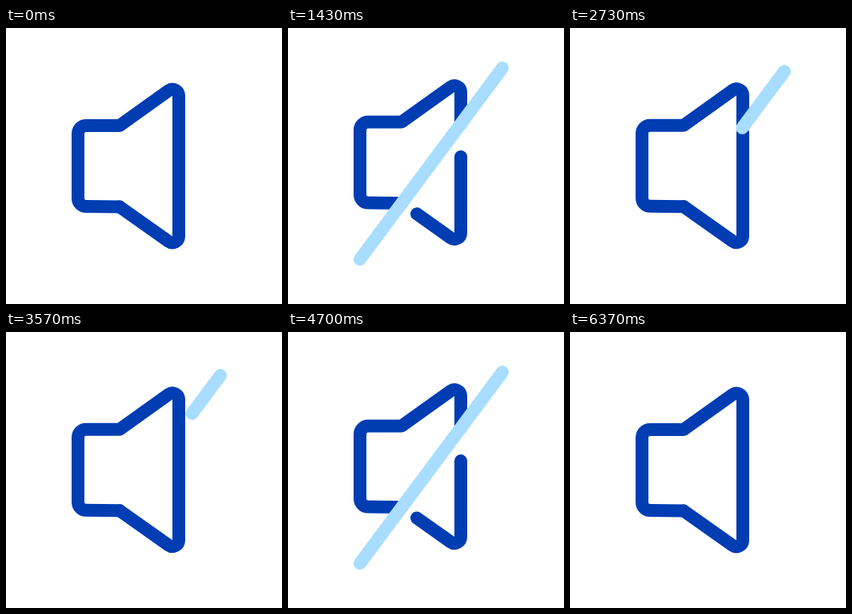
Animation of 345x345 px, one loop 6710 ms. Source, as an HTML page:

```html
<!DOCTYPE html>
<html lang="en">
<head>
<meta charset="utf-8">
<title>Mute icon</title>
<style>
  html, body { margin: 0; width: 100%; height: 100%; overflow: hidden; background: #fff; }
  svg { display: block; width: 100%; height: 100%; }
  path { fill: none; stroke-width: 16; stroke-linecap: round; stroke-linejoin: round; }
  .speaker { stroke: #003db3; }
  .slash { stroke: #a8ddff; }
</style>
</head>
<body>
<svg viewBox="0 0 345 345">
  <g id="icon">
    <path class="speaker" d="M216 124.3V84.5A8 8 0 0 0 203.5 78L142 122H100A10 10 0 0 0 90 132V213A10 10 0 0 0 100 223L142 223.5"/>
    <path class="speaker" id="lower"/>
    <path class="slash" id="slash"/>
  </g>
</svg>
<script>
const LOOP = 6710, CYCLE = LOOP / 2, ACTIVE = 3000, DRAW = 750, LIFT = 4.5;
const [icon, lower, slash] = ["icon", "lower", "slash"].map(id => document.getElementById(id));

const clamp = x => Math.min(1, Math.max(0, x));
const smooth = x => x * x * (3 - 2 * x);
const mix = (a, b, k) => a + (b - a) * k;
const span = (x, from, to) => clamp((x - from) / (to - from));

// The first pass skips every third step of the second one.
function stepTime(ms) {
  const rest = ms % 100;
  const late = ms >= 3400 && rest >= 70;
  return ms - rest + (late ? 70 : rest >= 30 ? 30 : 0);
}

function render(ms) {
  const now = stepTime(ms);
  const t = Math.min(now >= 3370 ? now - CYCLE : now, ACTIVE);
  const lift = LIFT / 2 * (1 - Math.cos(2 * Math.PI * t / ACTIVE));
  const drawn = smooth(clamp(Math.min(t, ACTIVE - t) / DRAW));
  const rightGap = span(drawn, 0.2, 0.8);
  const bottomGap = span(drawn, 0.5, 1);

  icon.setAttribute("transform", `translate(0 ${-lift})`);
  lower.setAttribute("d",
    `M${mix(142, 161, bottomGap)} ${mix(223.5, 236.8, bottomGap)}` +
    `L203.5 267A8 8 0 0 0 216 260.5V${mix(124.3, 165.5, rightGap)}`);
  slash.setAttribute("d", `M268 54.5L${mix(268, 90, drawn)} ${mix(54.5, 293.5, drawn)}`);
  slash.style.display = drawn > 0 ? "" : "none";
}

const start = performance.now();
function tick() {
  render((performance.now() - start) % LOOP);
  requestAnimationFrame(tick);
}
tick();
</script>
</body>
</html>
```
